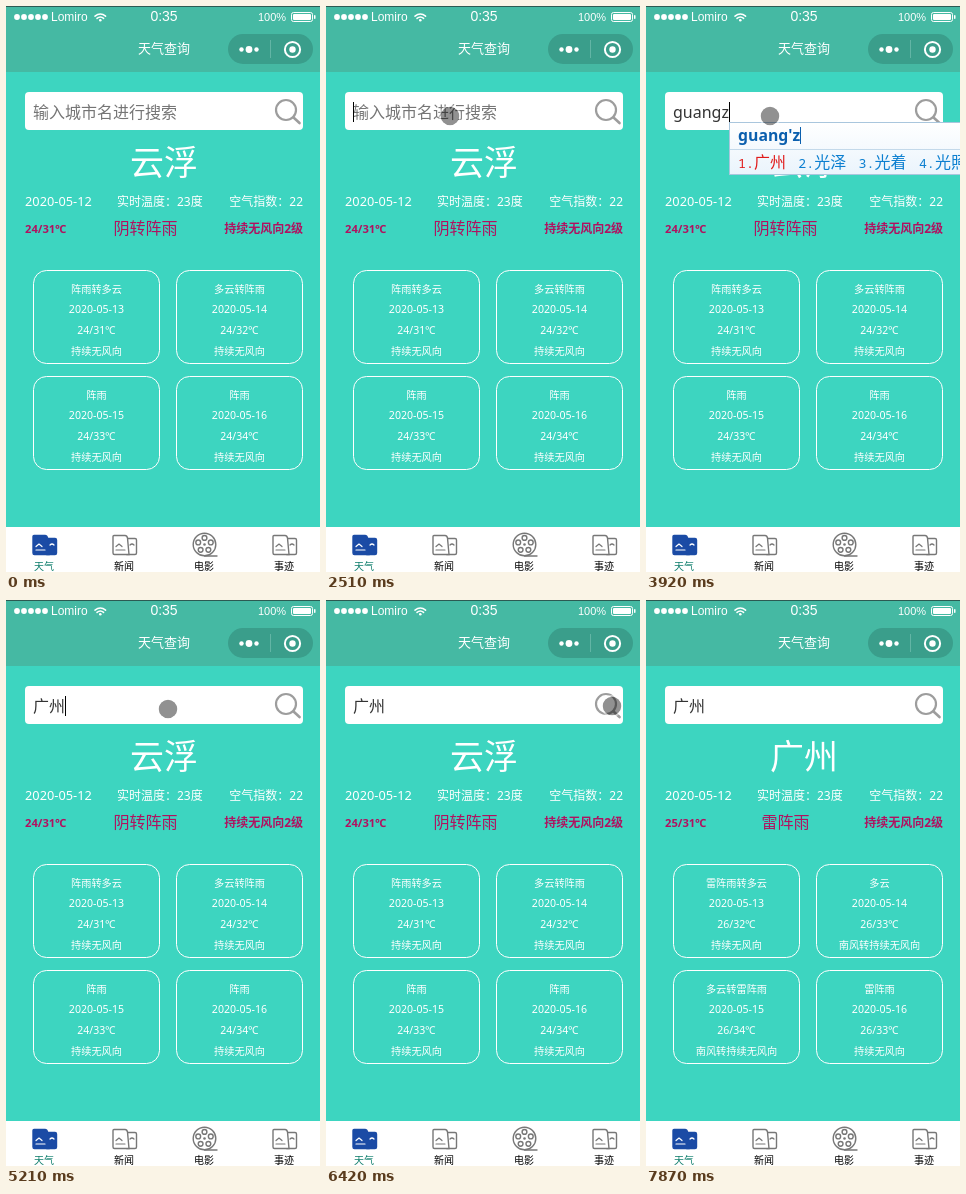
Recreate the animation shown at these times as an HTML page. Size 314 px wide and 566 px high, loop 8.62 s.

```html
<!DOCTYPE html>
<html lang="zh-CN">
<head>
<meta charset="utf-8">
<title>天气查询</title>
<style>
html, body { margin: 0; width: 100%; height: 100%; overflow: hidden; background: #3dd5c0; }
svg { display: block; width: 100vw; height: 100vh; }
text { font-family: 'Noto Sans', 'Noto Sans CJK SC', sans-serif; white-space: pre; }
.status { font-family: 'Liberation Sans', Arial, sans-serif; }
.mono { font-family: 'Noto Sans Mono', 'Liberation Mono', monospace; }
</style>
</head>
<body>
<svg id="stage" viewBox="0 0 314 566"></svg>
<script>
const LOOP = 8620;
const MAGENTA = '#b01260';
const stage = document.getElementById('stage');

const text = (x, y, size, str, { fill = '#fff', anchor = 'start', weight = 400, cls = '' } = {}) =>
  `<text x="${x}" y="${y}" font-size="${size}" fill="${fill}" text-anchor="${anchor}" font-weight="${weight}" class="${cls}">${str}</text>`;
const rect = (x, y, w, h, fill, extra = '') =>
  `<rect x="${x}" y="${y}" width="${w}" height="${h}" fill="${fill}" ${extra}/>`;
const circle = (x, y, r, fill, extra = '') =>
  `<circle cx="${x}" cy="${y}" r="${r}" fill="${fill}" ${extra}/>`;
const line = (d, stroke, width = 1) =>
  `<path d="${d}" fill="none" stroke="${stroke}" stroke-width="${width}" stroke-linecap="round" stroke-linejoin="round"/>`;
const middle = { anchor: 'middle' };

function header() {
  const signal = [0, 1, 2, 3, 4].map(i => circle(11 + i * 7, 11, 2.9, '#fff')).join('');
  const wifi = line('M89 10.2Q94.3 5.8 99.6 10.2M91 12.4Q94.3 9.6 97.6 12.4', '#fff', 1.5) + circle(94.3, 14.3, 1.3, '#fff');
  const battery = rect(285.5, 6.5, 21, 9, 'none', 'rx="2" stroke="#fff"') +
    rect(287, 8, 18, 6, '#fff', 'rx="1"') + rect(308, 9, 1.5, 4, '#fff', 'rx=".7"');
  const capsule = rect(222, 28, 85, 30, '#3a9e8b', 'rx="15"') +
    rect(264, 34, 1, 18, '#62b5a5') +
    circle(235.5, 43.5, 2.2, '#fff') + circle(243, 43.5, 3.4, '#fff') + circle(250.5, 43.5, 2.2, '#fff') +
    circle(286.5, 43.5, 7.6, 'none', 'stroke="#fff" stroke-width="2"') + circle(286.5, 43.5, 3.2, '#fff');
  return rect(0, 0, 314, 66, '#45b9a3') + rect(0, 0, 314, 1, '#2c5a52') + signal + wifi + battery + capsule +
    text(45, 15, 12, 'Lomiro', { cls: 'status' }) +
    text(158, 15, 14, '0:35', { cls: 'status', anchor: 'middle' }) +
    text(252, 15, 11, '100%', { cls: 'status' }) +
    text(158, 47, 13, '天气查询', middle);
}

function cardIcon(cx, active) {
  const edge = active ? '#1b4ba5' : '#777', inside = active ? '#1b4ba5' : '#fff', detail = active ? '#fff' : '#777';
  return `<g transform="translate(${cx} 539)">` +
    `<path d="M3-6.5H11Q12.5-6.5 12.5-5V8Q12.5 9.5 11 9.5H3Z" fill="${inside}" stroke="${edge}" stroke-width="1.4"/>` +
    `<path d="M-10-9.5H1Q3-9.5 3.5-7L5 9.5H-9.5Q-11 9.5-11 8V-8.5Q-11-9.5-10-9.5Z" fill="${inside}" stroke="${edge}" stroke-width="1.4"/>` +
    line('M-8 5H1M-8 1.5L-5-1L-2 1.5M6 0Q8-2 10 0', detail, 1.2) + '</g>';
}

function filmIcon(cx, cy) {
  const grey = 'stroke="#777" stroke-width="1.4"';
  let holes = '';
  for (let i = 0; i < 5; i++) {
    const a = (i * 72 - 90) * Math.PI / 180;
    holes += circle(cx + 6.6 * Math.cos(a), cy + 6.6 * Math.sin(a), 2.4, 'none', grey);
  }
  return circle(cx, cy, 11.3, 'none', grey) + holes + circle(cx, cy, 1.3, '#777') +
    line(`M${cx} ${cy + 11.5}H${cx + 12.5}`, '#777', 1.4);
}

function tabs() {
  const labels = ['天气', '新闻', '电影', '事迹'].map((label, i) =>
    text(38 + i * 80, 564, 10, label, { anchor: 'middle', fill: i ? '#000' : '#0c7d6b' })).join('');
  return rect(0, 521, 314, 45, '#fff') + cardIcon(38, true) + cardIcon(118) + filmIcon(198.5, 538.5) + cardIcon(278) + labels;
}

function forecast({ id, city, range, sky, days }) {
  const cards = days.map(([weather, temp, wind], i) => {
    const x = 27.5 + (i % 2) * 143, y = 264.5 + (i >> 1) * 106, cx = x + 63;
    return rect(x, y, 126, 93, 'none', 'rx="13" stroke="#fff"') +
      text(cx, y + 22, 10.2, weather, middle) +
      text(cx, y + 42.5, 10.6, `2020-05-${13 + i}`, middle) +
      text(cx, y + 63.5, 10.5, temp + '℃', middle) +
      text(cx, y + 84.5, 10.2, wind, middle);
  }).join('');
  return `<g id="${id}">` + text(158, 169, 34, city, middle) +
    text(19, 226.5, 11.2, range + '℃', { fill: MAGENTA, weight: 700 }) +
    text(139.5, 227.5, 16, sky, { fill: MAGENTA, weight: 500, anchor: 'middle' }) + cards + '</g>';
}

const calm = '持续无风向', southerly = '南风转持续无风向';
const before = {
  id: 'before', city: '云浮', range: '24/31', sky: '阴转阵雨',
  days: [['阵雨转多云', '24/31', calm], ['多云转阵雨', '24/32', calm], ['阵雨', '24/33', calm], ['阵雨', '24/34', calm]]
};
const after = {
  id: 'after', city: '广州', range: '25/31', sky: '雷阵雨',
  days: [['雷阵雨转多云', '26/32', calm], ['多云', '26/33', southerly], ['多云转雷阵雨', '26/34', southerly], ['雷阵雨', '26/33', calm]]
};

stage.innerHTML =
  `<defs><linearGradient id="panel" x2="0" y2="1"><stop stop-color="#fff"/><stop offset="1" stop-color="#eaf4fc"/></linearGradient></defs>` +
  rect(0, 0, 314, 566, '#3dd5c0') + header() +
  rect(19, 86, 278, 38, '#fff', 'rx="4"') +
  circle(280, 104, 10, 'none', 'stroke="#9d9d9d" stroke-width="2.2"') + line('M287.5 111.5L293.5 117', '#9d9d9d', 2.6) +
  '<text id="query" x="27" y="112" font-size="16"></text>' + rect(27, 96, 1, 20, '#000', 'id="caret"') +
  text(19, 200, 12.8, '2020-05-12') + text(111, 200, 12, '实时温度：23度') +
  text(297, 200, 12, '空气指数：22', { anchor: 'end' }) +
  text(297, 226.5, 12, '持续无风向2级', { fill: MAGENTA, weight: 700, anchor: 'end' }) +
  forecast(before) + forecast(after) + tabs() +
  '<g id="ime"></g>' +
  '<g id="pointer"><circle r="9.3"/><circle r="10.2" fill="none" stroke="#fff" stroke-opacity=".5" stroke-width="1.6"/></g>';

const [query, caret, ime, pointer, beforeView, afterView] =
  ['query', 'caret', 'ime', 'pointer', 'before', 'after'].map(id => document.getElementById(id));

// [start, typed text, composition, candidates]
const typing = [
  [0, ''],
  [3030, 'gu', 'gu', ['古', '故', '股', '顾', '鼓']],
  [3150, 'gua', 'gua', ['挂', '瓜', '刮', '寡', '呱']],
  [3370, 'guan', 'guan', ['关', '管', '官', '馆', '观']],
  [3470, 'guang', 'guang', ['光', '广', '逛', '咣', '胱']],
  [3920, 'guangz', "guang'z", ['广州', '光泽', '光着', '光照']],
  [4250, '广州']
];
const caretToggles = [1510, 2060, 2510, 4780, 5210, 5710];

// [start, x, y]; a missing position hides the pointer
const pointerPath = [
  [0], [740, 78, 317], [850, 95, 230], [960, 112, 160], [1070, 123, 122], [1180, 126, 111],
  [1400, 126, 112], [1510, 125, 111], [1610, 124, 110],
  [5210, 162, 109], [5320, 196, 107], [5430, 226, 105], [5540, 250, 104], [5650, 267, 104],
  [5760, 278, 105], [5880, 284, 106], [5990, 286, 106],
  [7090, 257, 145], [7200, 211, 245], [7300, 168, 372], [7410, 143, 451],
  [7630, 145, 474], [7750, 153, 551], [7870]
];
const pressed = t => (t >= 1400 && t < 1510) || (t >= 6110 && t < 6320);
const at = (steps, t) => steps.findLast(step => step[0] <= t);
const show = (node, on) => node.setAttribute('visibility', on ? 'visible' : 'hidden');

function drawIme(left, composition, candidates) {
  const step = candidates[0].length * 16 + 28.3;
  ime.innerHTML = rect(left + .5, 116.5, 320, 52, 'url(#panel)', 'stroke="#a9c6dd"') +
    rect(left + 1, 143, 320, 1, '#c3d9ea') +
    text(left + 9, 135, 15.8, composition, { fill: '#0b5fae', weight: 700 }) +
    candidates.map((word, i) => {
      const x = left + 9 + i * step, fill = i ? '#0c7fd0' : '#e01b1b';
      return text(x, 162, 13.3, `${i + 1}.`, { fill, cls: 'mono' }) + text(x + 16, 162, 16, word, { fill });
    }).join('');
  const end = left + 9 + ime.querySelector('text').getComputedTextLength();
  ime.insertAdjacentHTML('beforeend', rect(Math.round(end), 121, 1, 17, '#0b5fae'));
}

let shownTyping;
let caretX = 27;

function drawTyping(entry) {
  if (entry === shownTyping) return;
  shownTyping = entry;
  const [, typed, composition, candidates] = entry;
  query.textContent = typed || '输入城市名进行搜索';
  query.setAttribute('fill', typed ? '#333' : '#757575');
  caretX = typed ? Math.round(27 + query.getComputedTextLength()) : 27;
  caret.setAttribute('x', caretX);
  if (composition) drawIme(caretX, composition, candidates);
  else ime.innerHTML = '';
}

function render(now) {
  const t = now % LOOP;
  drawTyping(at(typing, t));
  show(caret, caretToggles.filter(toggle => toggle <= t).length % 2);
  show(beforeView, t < 6430);
  show(afterView, t >= 6430);
  const [, x, y] = at(pointerPath, t);
  show(pointer, x !== undefined);
  if (x !== undefined) pointer.setAttribute('transform', `translate(${x} ${y})`);
  pointer.firstChild.setAttribute('fill-opacity', pressed(t) ? .58 : .43);
}

const start = performance.now();
function tick() {
  render(performance.now() - start);
  requestAnimationFrame(tick);
}
tick();
</script>
</body>
</html>
```
